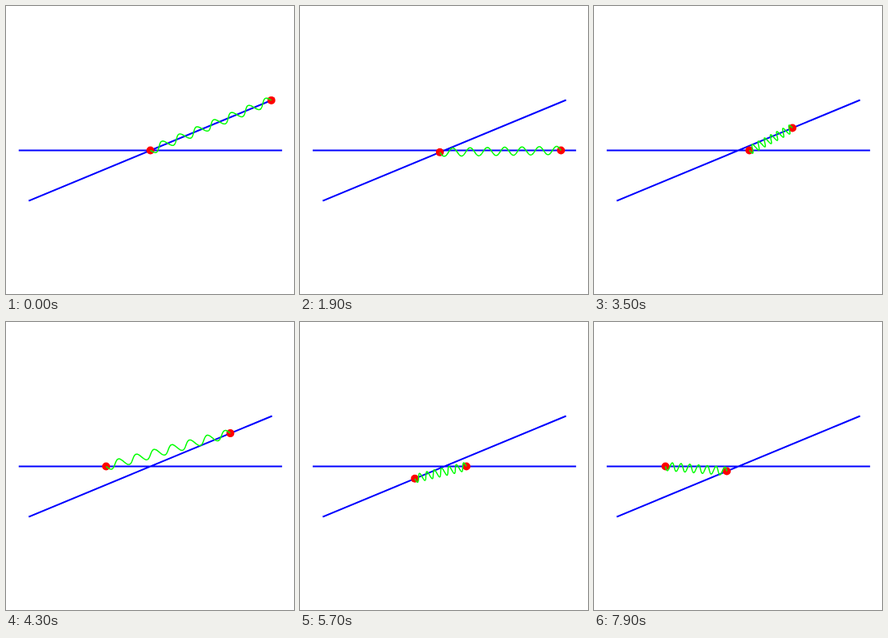
An HTML page that plays this animation: 360x360 px, repeating every 8 s.

```html
<!DOCTYPE html>
<html lang="en">
<head>
<meta charset="utf-8">
<title>Two beads on crossed wires</title>
<style>
  html, body { margin: 0; height: 100%; overflow: hidden; background: #fff; }
  svg { display: block; width: 100%; height: 100%; }
</style>
</head>
<body>
<svg viewBox="0 0 360 360">
  <g transform="translate(180.5 180.5)" fill="none">
    <path id="wires" stroke="#00f" stroke-width="2" stroke-linecap="square"/>
    <circle id="flat" r="5" fill="#f00"/>
    <circle id="tilted" r="5" fill="#f00"/>
    <path id="spring" stroke="#0f0" stroke-width="1.5"/>
  </g>
</svg>
<script>
const LOOP = 8000, STEP = 100;
const REACH = 360 / 2.2;          // half length of each wire
const ANGLE = Math.PI / 8;
const COS = Math.cos(ANGLE), SIN = Math.sin(ANGLE);
const COILS = 7, SWING = 5.1, POINTS = 280;

// Normal modes of two equal beads joined by a spring of zero rest length
const SLOW = Math.PI / 3 * Math.sqrt(1 - COS);
const FAST = Math.PI / 3 * Math.sqrt(1 + COS);

const el = id => document.getElementById(id);
const flat = el('flat'), tilted = el('tilted'), spring = el('spring');

const onTilt = s => [s * COS, -s * SIN];
el('wires').setAttribute('d',
  `M${-REACH} 0H${REACH}M${onTilt(-REACH)}L${onTilt(REACH)}`);

function place(bead, [x, y]) {
  bead.setAttribute('cx', x);
  bead.setAttribute('cy', y);
}

function coil([x0, y0], [x1, y1]) {
  const dx = x1 - x0, dy = y1 - y0, length = Math.hypot(dx, dy) || 1;
  const points = [];
  for (let i = 0; i <= POINTS; i++) {
    const u = i / POINTS;
    const off = SWING * Math.sin(2 * Math.PI * COILS * u) / length;
    points.push(`${(x0 + dx * u - dy * off).toFixed(2)} ${(y0 + dy * u + dx * off).toFixed(2)}`);
  }
  return 'M' + points.join('L');
}

function draw(ms) {
  const t = Math.floor(ms % LOOP / STEP) * STEP / 1000;
  const slow = REACH / 2 * Math.cos(SLOW * t);
  const fast = REACH / 2 * Math.cos(FAST * t);
  const a = [slow - fast, 0], b = onTilt(slow + fast);
  place(flat, a);
  place(tilted, b);
  spring.setAttribute('d', coil(a, b));
}

const start = performance.now();
function frame() {
  draw(performance.now() - start);
  requestAnimationFrame(frame);
}
frame();
</script>
</body>
</html>
```
